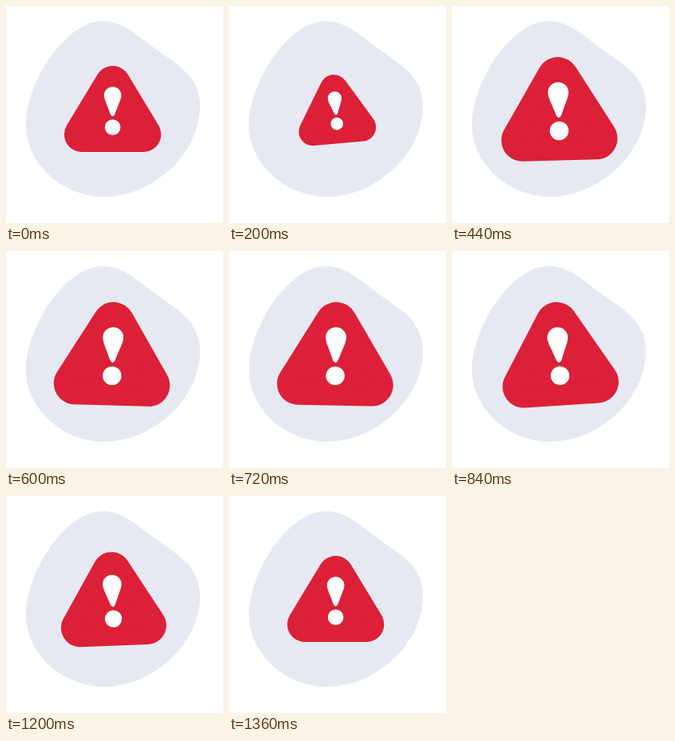
An HTML page with a canvas that plays this animation: 272 px wide and 272 px high, repeating every 1.4 s.

```html
<!DOCTYPE html>
<html lang="en">
<head>
<meta charset="utf-8">
<title>Warning</title>
<style>
  html, body { margin: 0; width: 100%; height: 100%; overflow: hidden; background: #fff; }
  canvas { display: block; width: 272px; height: 272px; }
</style>
</head>
<body>
<canvas id="stage"></canvas>
<script>
const SIZE = 272;
const LOOP = 1400;
const STEP = 40;
const BEAT = 94.64;
const TILT = 5;
const PIVOT = { x: 133.7, y: 130 };
const RED = '#db2037';

const canvas = document.getElementById('stage');
const ctx = canvas.getContext('2d');
const ratio = window.devicePixelRatio || 1;
canvas.width = canvas.height = SIZE * ratio;

const blob = new Path2D(
  'M122 19 C146 19 165 37 185 52 C213 73 243 86 243 126 ' +
  'C243 185 184 239 123 239 C70 239 25 197 25 149 C25 99 72 19 122 19 Z');
const triangle = new Path2D('M133.7 97 L172.4 161 L95 161 Z');
const mark = new Path2D(
  'M122.9 112 A10.8 10.8 0 0 1 144.5 112 C144.5 117 141 123 136.3 136 ' +
  'Q133.7 140.5 131.1 136 C126.4 123 122.9 117 122.9 112 Z');
const dot = new Path2D();
dot.arc(133.7, 152, 9.8, 0, Math.PI * 2);

// Pose keys: [beat, scale, degrees]
const keys = [[0, 1, 0], [2, 0.8, -TILT], [3, 0.8, -TILT]];
for (let i = 1; i <= 8; i++) keys.push([3 + i, 1.2, i % 2 ? TILT : -TILT]);
keys.push([14, 1, 0]);

function poseAt(ms) {
  const beat = ms / BEAT;
  const next = keys.findIndex(key => key[0] > beat);
  if (next < 0) return { scale: 1, angle: 0 };
  const [b0, s0, a0] = keys[next - 1];
  const [b1, s1, a1] = keys[next];
  const p = (beat - b0) / (b1 - b0);
  return { scale: s0 + (s1 - s0) * p, angle: (a0 + (a1 - a0) * p) * Math.PI / 180 };
}

function fill(path, color) {
  ctx.fillStyle = color;
  ctx.fill(path);
}

function draw(ms) {
  const { scale, angle } = poseAt(ms);
  ctx.setTransform(ratio, 0, 0, ratio, 0, 0);
  ctx.fillStyle = '#fff';
  ctx.fillRect(0, 0, SIZE, SIZE);
  fill(blob, '#e6e9f1');

  ctx.translate(PIVOT.x, PIVOT.y);
  ctx.rotate(angle);
  ctx.scale(scale, scale);
  ctx.translate(-PIVOT.x, -PIVOT.y);

  // The thick round stroke gives the triangle its soft corners.
  ctx.lineJoin = 'round';
  ctx.lineWidth = 44;
  ctx.strokeStyle = RED;
  ctx.stroke(triangle);
  fill(triangle, RED);
  fill(mark, '#fff');
  fill(dot, '#fff');
}

const start = performance.now();
function tick() {
  const elapsed = (performance.now() - start) % LOOP;
  draw(Math.floor(elapsed / STEP) * STEP);
  requestAnimationFrame(tick);
}
tick();
</script>
</body>
</html>
```
